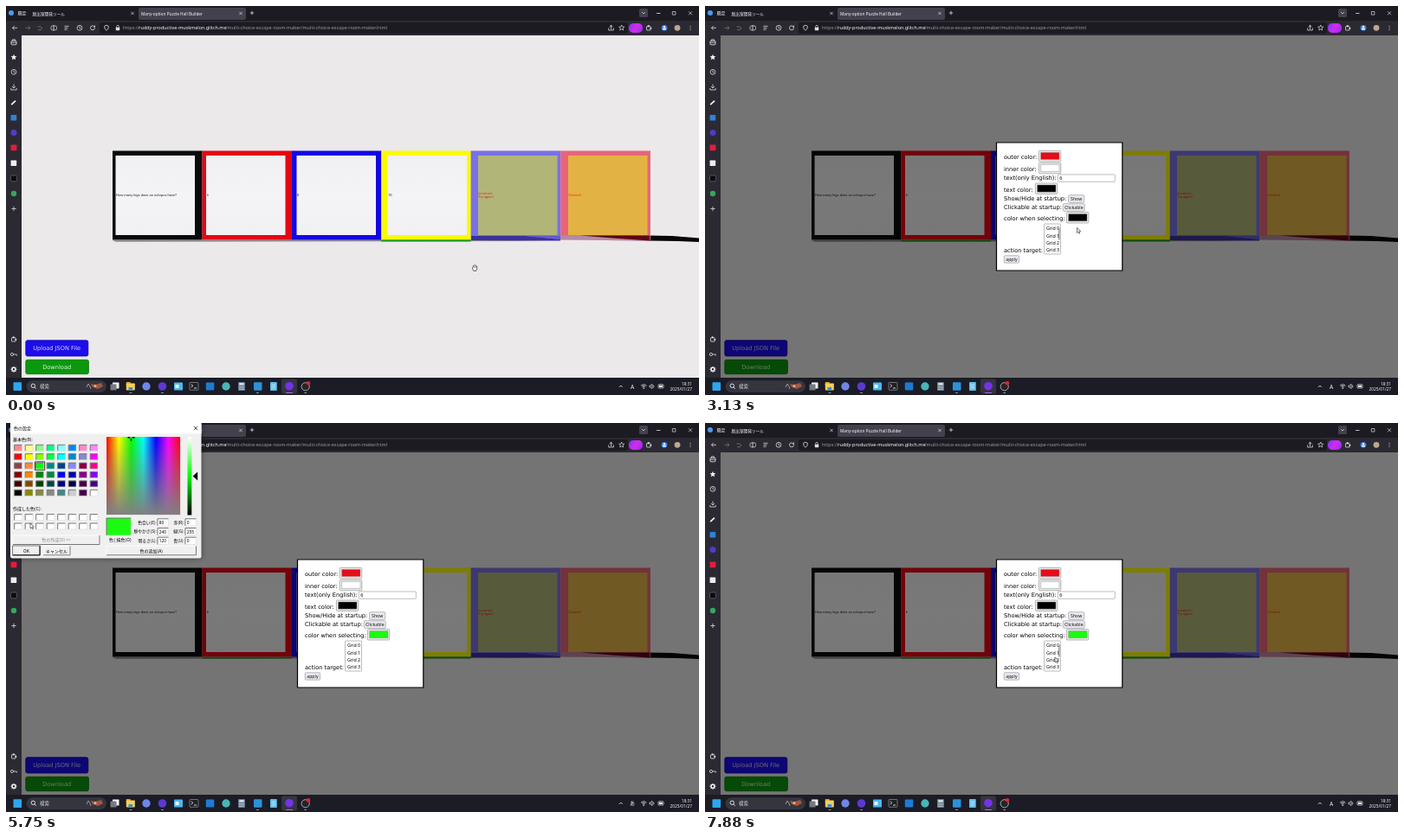
These frames come from a looping animation (800x450 px, 8000 ms). An HTML page with a canvas:

```html
<!DOCTYPE html>
<html lang="ja">
<head>
<meta charset="utf-8">
<title>Screen demo</title>
<style>
html, body { margin: 0; width: 100%; height: 100%; overflow: hidden; background: #1c1b22; }
canvas { display: block; width: 800px; height: 450px; }
</style>
</head>
<body>
<canvas id="stage" width="800" height="450"></canvas>
<script>
const g = document.getElementById('stage').getContext('2d');
const LOOP = 8000;
const UI = '"Noto Sans", "Noto Sans CJK JP", "Noto Sans CJK", sans-serif';
const JP = '"Noto Sans CJK JP", "Noto Sans CJK", sans-serif';
const WIDE = '"DejaVu Sans", sans-serif';
const TINY = 'Roboto, sans-serif';

const DIALOG_OPEN = 1500, PICKER_OPEN = 4250, PICK_GREEN = 5200, PICKER_CLOSE = 6500;

// time, x, y of the pointer tip
const PATH = [
  [0, 541, 303], [250, 541, 303], [1250, 304, 269], [1600, 304, 269],
  [2400, 402, 262], [2750, 403, 266], [3130, 429.5, 256.5], [3750, 429, 245],
  [4150, 429, 245], [4630, 69, 118], [5050, 40, 50], [5300, 40, 50],
  [5750, 28, 116], [6200, 26, 146], [6600, 28, 147], [6750, 32, 149],
  [6950, 40, 152], [7600, 400, 268], [7880, 404, 271], [8000, 404, 272]
];

const BASIC = ('f88 ff8 8f8 0f8 8ff 08f f8c f8f ' +
  'f00 ff0 8f0 0f4 0ff 08c 88c f0f ' +
  '844 f84 0f0 088 048 88f 804 f08 ' +
  '800 f80 080 084 00f 00a 808 80f ' +
  '400 840 040 044 008 004 404 408 ' +
  '000 880 884 888 488 ccc 404 fff').split(' ');

function box(x, y, w, h, fill, r = 0, stroke, lw = 0.6) {
  g.beginPath();
  g.roundRect(x, y, w, h, r);
  if (fill) { g.fillStyle = fill; g.fill(); }
  if (stroke) { g.strokeStyle = stroke; g.lineWidth = lw; g.stroke(); }
}

function dot(x, y, r, fill, stroke, lw = 0.8) {
  g.beginPath();
  g.arc(x, y, r, 0, 7);
  if (fill) { g.fillStyle = fill; g.fill(); }
  if (stroke) { g.strokeStyle = stroke; g.lineWidth = lw; g.stroke(); }
}

function poly(pts, fill, stroke, lw = 0.8, close = true) {
  g.beginPath();
  for (let i = 0; i < pts.length; i += 2) g.lineTo(pts[i], pts[i + 1]);
  if (close) g.closePath();
  if (fill) { g.fillStyle = fill; g.fill(); }
  if (stroke) { g.strokeStyle = stroke; g.lineWidth = lw; g.stroke(); }
}

const line = (pts, color = '#dddde2', lw = 0.8) => poly(pts, null, color, lw, false);

function text(s, x, y, size, color, font = UI, align = 'left') {
  g.font = size + 'px ' + font;
  g.textAlign = align;
  g.fillStyle = color;
  g.fillText(s, x, y);
}

function ramp(x0, y0, x1, y1, stops) {
  const grad = g.createLinearGradient(x0, y0, x1, y1);
  stops.forEach((c, i) => grad.addColorStop(i / (stops.length - 1), c));
  return grad;
}

function cross(x, y, r, color = '#dddde2') {
  line([x - r, y - r, x + r, y + r], color, 0.7);
  line([x + r, y - r, x - r, y + r], color, 0.7);
}

function plus(x, y, r) {
  line([x - r, y, x + r, y]);
  line([x, y - r, x, y + r]);
}

function star(x, y, r, fill, stroke) {
  const pts = [];
  for (let i = 0; i < 10; i++) {
    const a = i * Math.PI / 5 - Math.PI / 2, k = i % 2 ? r * 0.45 : r;
    pts.push(x + k * Math.cos(a), y + k * Math.sin(a));
  }
  poly(pts, fill, stroke, 0.7);
}

function puzzle(x, y) {
  box(x - 2.5, y - 1.8, 4.6, 4.4, null, 0.5, '#dddde2', 0.8);
  dot(x - 0.3, y - 2.2, 1.1, '#dddde2');
  dot(x + 2.4, y + 0.4, 1, '#dddde2');
}

function reload(x, y) {
  g.beginPath();
  g.arc(x, y, 2.5, 0, 5.2);
  g.strokeStyle = '#dddde2';
  g.lineWidth = 0.8;
  g.stroke();
  poly([x + 0.4, y - 1, x + 2.9, y - 3, x + 2.9, y - 0.6], '#dddde2');
}

function clock(x, y) {
  dot(x, y, 2.9, null, '#dddde2');
  line([x, y - 1.8, x, y + 0.2, x + 1.5, y + 0.8]);
}

function drawBrowser() {
  box(0, 0, 800, 17, '#1c1b22');
  box(0, 17, 800, 17, '#2b2a33');
  box(153, 2, 124, 14, '#42414d', 2);
  box(108, 19, 610, 13, '#1c1b22', 2);

  dot(6, 8, 3, '#4a9cf0');
  text('既定', 13.5, 10.4, 5, '#fbfbfe', JP);
  text('脱出室開発ツール', 30.5, 10.6, 4.7, '#fbfbfe', JP);
  text('Many-option Puzzle Hall Builder', 156, 10.6, 4.75, '#fbfbfe');
  cross(146, 8.5, 1.7);
  cross(271, 8.5, 1.7);
  plus(284, 8, 2.2);
  box(731, 3, 10, 10, '#42414d', 1.5);
  line([734.2, 7.2, 736, 9, 737.8, 7.2]);
  line([751, 8.5, 755.5, 8.5]);
  box(769.3, 6.5, 3.6, 3.6, null, 0, '#dddde2', 0.7);
  cross(790, 8.3, 2);

  line([13, 25.3, 7.5, 25.3]);
  line([9.8, 23, 7.5, 25.3, 9.8, 27.6]);
  line([22.5, 25.3, 28, 25.3], '#77767f');
  line([25.7, 23, 28, 25.3, 25.7, 27.6], '#77767f');
  line([36.5, 24, 40, 24, 42, 25.8, 40, 27.6, 37, 27.6], '#77767f');
  box(52, 23, 6.5, 4.8, null, 1.5, '#dddde2', 0.7);
  line([55, 22, 55, 28.6]);
  for (let i = 0; i < 3; i++) line([67.5, 23.3 + i * 2, 72.5 - i, 23.3 + i * 2]);
  clock(85, 25.3);
  reload(100, 25.3);
  poly([113.7, 23.2, 116, 22.2, 118.3, 23.2, 118, 26.2, 116, 28.3, 114, 26.2], null, '#dddde2');
  box(126.8, 24.8, 4.4, 3.4, '#dddde2', 0.5);
  box(127.7, 22.4, 2.6, 4, null, 1.2, '#dddde2', 0.7);
  text('https://', 135, 27.2, 5.45, '#9c9ba3');
  text('ruddy-productive-muskmelon.glitch.me', 153.3, 27.2, 5.45, '#fbfbfe');
  text('/multi-choice-escape-room-maker/multi-choice-escape-room-maker.html', 253.5, 27.2, 5.48, '#9c9ba3');

  line([698.5, 27, 698.5, 22.3]);
  line([696.5, 24.2, 698.5, 22.3, 700.5, 24.2]);
  line([695.7, 25.5, 695.7, 28, 701.3, 28, 701.3, 25.5]);
  star(710.7, 25.3, 3.3, null, '#dddde2');
  box(719, 20, 16, 11, ramp(719, 20, 735, 31, ['#7a35ff', '#d32bea', '#8a2ff5']), 5);
  puzzle(742, 25.4);
  dot(760, 25.3, 3.4, '#3b82e8');
  dot(760, 24.3, 1.2, '#eef4ff');
  box(757.9, 25.8, 4.2, 1.7, '#eef4ff', 0.8);
  dot(775, 25.3, 3.4, '#bca891');
  for (let i = -1; i < 2; i++) dot(790, 25.3 + i * 2, 0.55, '#dddde2');
}

function drawSidebar() {
  box(0, 34, 18, 396, '#2b2a33');
  box(6, 40.3, 6, 4.5, null, 0.8, '#dddde2', 0.9);
  line([7.5, 40, 7.5, 38.8, 10.5, 38.8, 10.5, 40]);
  line([6, 42.3, 12, 42.3]);
  star(9, 59.3, 3.6, '#f5f5f8');
  clock(9, 76.3);
  line([9, 90.5, 9, 95]);
  line([7, 93, 9, 95, 11, 93]);
  line([5.8, 95, 5.8, 97, 12.2, 97, 12.2, 95]);
  line([6.2, 114.2, 11, 109.6], '#f5f5f8', 1.7);
  box(5.6, 126, 6.6, 6.6, '#2f83d8', 0.7);
  dot(9, 146.5, 3.5, '#5639c9');
  box(5.6, 160.5, 6.8, 6.8, '#e51c3e', 0.7);
  box(5.6, 178.5, 6.6, 6.6, '#eeeeee', 0.7);
  box(5.6, 196, 6.8, 6.8, '#0c0c0e', 1.2, '#77777c');
  dot(9, 217, 3.2, '#36a760');
  plus(9, 234.5, 2.6);
  puzzle(9, 385.5);
  dot(7, 403, 1.6, null, '#dddde2');
  line([8.6, 403, 12.3, 403, 12.3, 404.6]);
  for (let i = 0; i < 4; i++) {
    const a = i * Math.PI / 4, c = 3.4 * Math.cos(a), s = 3.4 * Math.sin(a);
    line([9 - c, 420.3 - s, 9 + c, 420.3 + s], '#f5f5f8', 1.2);
  }
  dot(9, 420.3, 1.9, '#2b2a33', '#f5f5f8', 1.3);
}

function cell(x, outer, inner, ix) {
  box(x, 167.5, 103.6, 103, outer);
  box(ix, 173, 91.5, 92, inner);
}

function drawScene(t) {
  box(18, 34, 782, 396, '#ebe9ea');
  poly([123, 271, 536, 270, 640, 272, 440, 272.3, 127, 272.8], '#8b898b');
  poly([741, 265.5, 769, 266, 800, 268.5, 800, 273, 775, 272, 741, 271.5], '#080808');

  const white = ramp(0, 173, 0, 265, ['#f0eff1', '#f4f3f5', '#f1f0f2']);
  cell(123, '#0b0a0b', white, 126.5);
  cell(226.6, '#e60613', white, 231);
  cell(330, '#1407e4', white, 335.5);
  cell(433.2, '#fbfb05', white, 440.5);
  cell(536.6, '#7a70e8', '#b1b678', 545);
  cell(640.2, '#e86478', '#e2b344', 649);
  box(743.2, 167, 0.5, 104, '#d9727f');
  box(433.2, 270.5, 103.4, 2, '#159a18');
  if (t > 1000) box(226.6, 270.8, 103.4, 1.7, '#159a18');

  // shadows seen through the two translucent cells
  poly([537, 266, 600, 266, 640, 270, 640, 271.5, 537, 271], '#3a319f');
  poly([600, 266, 640, 266, 640, 270], '#655bd2');
  poly([640, 265.5, 680, 265.5, 743, 270.5, 743, 272, 640, 270], '#b58aa5');
  poly([663, 265.5, 743, 265.5, 743, 271.5, 700, 268.5], '#5f0710');

  text('How many legs does an octopus have?', 127, 220.3, 4.05, '#242225', TINY);
  text('6', 231.7, 220.3, 4.05, '#242225', TINY);
  text('8', 336, 220.3, 4.05, '#242225', TINY);
  text('10', 441, 220.3, 4.05, '#242225', TINY);
  text('incorrect', 545.3, 218, 4.05, '#e0202a', TINY);
  text('Try again!', 545.3, 222.4, 4.05, '#e0202a', TINY);
  text('Correct!', 649.5, 220.3, 4.05, '#e2242a', TINY);

  box(22.8, 386.8, 72, 18.2, '#1d0dec', 2, '#0d06a8', 0.8);
  text('Upload JSON File', 58.7, 398.2, 6.65, '#d9d7fb', WIDE, 'center');
  box(22.8, 409.3, 72.6, 16.4, '#0b980e', 2, '#08700a', 0.8);
  text('Download', 58.7, 420.2, 6.65, '#dff5df', WIDE, 'center');
}

function swatch(x, y, color) {
  box(x + 0.4, y + 0.4, 25.4, 12.4, '#efefef', 1, '#858585');
  box(x + 2.6, y + 2.4, 21.4, 8.2, color, 0, '#8a8a8a', 0.5);
}

function button(s, x, y, w, h) {
  box(x, y, w, h, '#e9e9ed', 1.2, '#8f8f9d');
  text(s, x + w / 2, y + h / 2 + 2, 5.2, '#111', UI, 'center');
}

function drawDialog(t) {
  box(18, 34, 782, 396, 'rgba(0,0,0,0.5)');
  box(336.5, 158, 145.3, 148, '#fff', 0, '#000', 1.2);
  const rows = [['outer color:', 177.2], ['inner color:', 190.8], ['text(only English):', 201.2],
    ['text color:', 214.6], ['Show/Hide at startup:', 225.2], ['Clickable at startup:', 235.2],
    ['color when selecting:', 248.4], ['action target:', 284.6]];
  rows.forEach(([s, y]) => text(s, 345, y, 6.65, '#000', WIDE));
  swatch(385, 167, '#e60c18');
  swatch(385, 181, '#fff');
  box(407.3, 195, 66, 8.3, '#fff', 0.7, '#8f8f9d');
  text('6', 409.2, 201.2, 5.3, '#000');
  swatch(381, 204.6, '#000');
  button('Show', 419.5, 218.7, 18.3, 8.6);
  button('Clickable', 413.3, 228.7, 25, 8.6);
  swatch(417, 238.2, t < PICK_GREEN ? '#000' : '#1cfa12');
  box(391.5, 252, 19, 35, '#fff', 0.8, '#8f8f9d');
  for (let i = 0; i < 4; i++) text('Grid ' + i, 394, 259.2 + i * 8.35, 5.3, '#000');
  if ((t > 2100 && t < 4900) || t > 7400) box(408.2, 256.5, 1.2, 14, '#77777c', 0.6);
  button('apply', 345.2, 288.7, 17.4, 8.5);
}

function sunken(x, y, w, h, fill) {
  box(x, y, w, h, fill);
  line([x, y + h, x, y, x + w, y], '#777', 1);
  line([x, y + h, x + w, y + h, x + w, y], '#d8d8d8', 0.6);
}

function winButton(s, x, y, w, color = '#000', edge = '#777') {
  box(x, y, w, 10.5, '#f0f0f0', 0, '#fff', 0.8);
  line([x, y + 10.5, x + w, y + 10.5, x + w, y], edge, 1);
  text(s, x + w / 2, y + 7.2, 5, color, JP, 'center');
}

function drawPicker(t) {
  const green = t >= PICK_GREEN;
  g.save();
  g.shadowColor = 'rgba(0,0,0,0.5)';
  g.shadowBlur = 6;
  box(5, -1, 220.5, 157.5, '#f0f0f0', 2.5);
  g.restore();
  box(5, 0, 220.5, 12.5, '#fff');
  text('色の設定', 9, 8.2, 5, '#000', JP);
  cross(219, 6, 2.1, '#111');

  text('基本色(B):', 8, 21.4, 5, '#000', JP);
  BASIC.forEach((c, i) => {
    const x = 9.7 + (i % 8) * 12.5, y = 25.3 + Math.floor(i / 8) * 10.4;
    sunken(x, y, 8.8, 7, '#' + c);
    if (i === (green ? 18 : 40)) box(x - 1.2, y - 1.2, 11.2, 9.4, null, 0, '#000', 0.8);
  });
  text('作成した色(C):', 8, 101.4, 5, '#000', JP);
  for (let i = 0; i < 16; i++) sunken(9.7 + (i % 8) * 12.5, 105.6 + (i >> 3) * 10.4, 8.8, 7, '#fff');
  winButton('色の作成(D) >>', 8, 130, 100, '#8a8a8a');
  winButton('OK', 8, 142.3, 31, '#000', '#000');
  box(7.6, 142, 31.8, 11, null, 0, '#222', 0.6);
  winButton('キャンセル', 43, 142.3, 31);
  winButton('色の追加(A)', 116, 142.3, 103.5);

  box(116, 16, 85.5, 90.5, ramp(116, 0, 201.5, 0, ['#f00', '#ff0', '#0f0', '#0ff', '#00f', '#f0f', '#f00']));
  box(116, 16, 85.5, 90.5, ramp(0, 16, 0, 106.5, ['rgba(128,128,128,0)', 'rgb(128,128,128)']));
  line([201.5, 16, 201.5, 106.5, 116, 106.5], '#fff', 0.7);
  g.save();
  g.beginPath();
  g.rect(116, 16, 85.5, 90.5);
  g.clip();
  const cx = green ? 144.5 : 173.2, cy = green ? 16.8 : 105.2;
  for (const [dx, dy] of [[1, 0], [-1, 0], [0, 1], [0, -1]])
    line([cx + dx * 1.3, cy + dy * 1.3, cx + dx * 4, cy + dy * 4], '#000', 1.4);
  g.restore();
  box(209.5, 16, 4.8, 90.5, ramp(0, 16, 0, 106.5, ['#fff', green ? '#0f0' : '#808080', '#000']));
  const ay = green ? 61.5 : 106;
  poly([215.8, ay, 221.2, ay - 5, 221.2, ay + 5], '#000');
  sunken(116, 110, 28.3, 20, green ? '#1cfa12' : '#000');
  text('色 | 純色(O)', 119, 137, 5, '#000', JP);

  const left = [['色合い(E):', green ? 80 : 160], ['鮮やかさ(S):', green ? 240 : 0], ['明るさ(L):', green ? 120 : 0]];
  const right = [['赤(R):', 0], ['緑(G):', green ? 255 : 0], ['青(U):', 0]];
  for (let i = 0; i < 3; i++) {
    const y = 110.8 + i * 10.7;
    [[left[i], 175], [right[i], 207]].forEach(([[label, v], x]) => {
      text(label, x - 1, y + 5.8, 4.8, '#000', JP, 'right');
      sunken(x, y, 12.6, 8.2, '#fff');
      text(v, x + 1.7, y + 6, 4.8, '#000');
    });
  }
}

function drawTaskbar(t) {
  box(0, 430, 800, 20, '#1b1c25');
  box(8.5, 435.3, 9.6, 9.6, '#2ea5ef', 0.7);
  box(24, 433.8, 91.5, 12.6, '#34353f', 6.3, '#474852', 0.5);
  dot(31.3, 439.3, 2.2, null, '#f0f0f4', 0.9);
  line([32.9, 441, 34.7, 442.8], '#f0f0f4', 0.9);
  text('検索', 39, 442.2, 5.4, '#dddde4', JP);
  line([93, 441, 95, 437, 97, 440, 98, 443], '#b7b3b5', 0.8);
  poly([98, 437, 103, 438, 110, 436, 112, 440, 106, 443, 100, 441], '#a6563c');
  dot(103, 439.5, 1.5, '#d6b795');

  box(123, 435.5, 7.5, 7, '#f2f2f2', 0.5);
  box(120.5, 437.5, 7, 7, '#777981', 0.5);
  box(138.8, 435, 5, 4, '#e0a020', 0.6);
  box(138.8, 436.5, 10, 8, '#f9cf58', 0.7);
  box(141.5, 441, 4.6, 3.5, '#3c8fd4', 0.5);
  dot(162, 440, 4.7, '#6f86e8');
  dot(180.5, 440, 4.8, '#5a3ad2');
  box(194, 435.5, 10, 9, '#49b9f1', 0.8);
  box(195.5, 438, 4, 4, '#eaf6fc');
  box(212, 435.5, 10, 8.8, '#202124', 0.8, '#aaa');
  line([213.8, 437.6, 215.8, 439.4, 213.8, 441.2], '#fff');
  line([217, 442, 220, 442], '#fff');
  box(230.8, 435.5, 9.5, 9, '#1c7cd5', 1);
  dot(254, 440, 4.7, '#48b7b6');
  box(268, 435, 8, 10, '#68788a', 0.8);
  box(269.3, 436.3, 5.4, 2, '#e8f5fc');
  for (let i = 0; i < 9; i++) box(269.3 + (i % 3) * 2, 439.4 + Math.floor(i / 3) * 1.8, 1.3, 1.1, '#c6d4df');
  box(286, 435.3, 9.5, 9.5, '#2b92d9', 1);
  box(305, 435, 7.8, 10, '#61bde8', 0.8);
  for (let i = 0; i < 3; i++) line([306.6, 438 + i * 2, 311.2, 438 + i * 2], '#e9f8ff', 0.7);
  box(318, 431.5, 18, 17, '#343540', 2);
  dot(327, 439.7, 4.8, '#7433e8');
  dot(345.7, 440.3, 4.6, '#25252a', '#c9c9ce', 0.8);
  dot(349, 436.3, 2.3, '#e8212b');
  for (const x of [144, 180.5, 290.5, 345.7]) box(x - 1.5, 447, 3, 0.9, '#9a9ba3', 0.4);
  box(323, 447, 8, 1, '#b06fe0', 0.5);

  line([707.8, 441, 709.8, 439, 711.8, 441], '#eee');
  if (t >= 4300 && t < 6500) text('あ', 723, 442.4, 6, '#f2f2f2', JP, 'center');
  else text('A', 723, 442.5, 6.6, '#f2f2f2', UI, 'center');
  for (let r = 1.5; r < 5; r += 1.5) {
    g.beginPath();
    g.arc(736.2, 442.3, r, -2.4, -0.75);
    g.strokeStyle = '#f2f2f2';
    g.lineWidth = 0.7;
    g.stroke();
  }
  dot(736.2, 442.2, 0.7, '#f2f2f2');
  poly([743, 439, 744.3, 439, 746, 437.4, 746, 442.6, 744.3, 441, 743, 441], null, '#f2f2f2', 0.7);
  line([747.3, 438.5, 748, 440, 747.3, 441.5], '#f2f2f2', 0.7);
  box(753, 437.8, 6, 4.2, null, 0.8, '#f2f2f2', 0.7);
  box(754, 438.8, 4, 2.2, '#f2f2f2');
  text('18:31', 792, 438.8, 4.8, '#f2f2f2', UI, 'right');
  text('2025/01/27', 792, 445.3, 4.8, '#f2f2f2', UI, 'right');
}

function pointerAt(t) {
  let i = 1;
  while (i < PATH.length - 1 && PATH[i][0] < t) i++;
  const [t0, x0, y0] = PATH[i - 1], [t1, x1, y1] = PATH[i];
  const u = (t - t0) / (t1 - t0), k = u * u * (3 - 2 * u);
  return [x0 + (x1 - x0) * k, y0 + (y1 - y0) * k];
}

function drawPointer(t) {
  const [x, y] = pointerAt(t);
  g.save();
  g.translate(x, y);
  g.lineJoin = 'round';
  if (t < DIALOG_OPEN && y > 273) {
    poly([-2.8, 0, -1.8, -0.5, -1.5, -2.6, -0.4, -3, 0.4, -3.1, 1.4, -2.7, 2.6, -2, 2.7, 0.6, 1.7, 3.4, -1.2, 3.4],
      '#fff', '#222', 0.7);
    for (let i = 0; i < 3; i++) line([-0.7 + i * 1.1, -2.2, -0.6 + i * 1.1, -0.3], '#333', 0.4);
  } else {
    poly([0, 0, 0, 5.9, 1.4, 4.7, 2.4, 6.8, 3.3, 6.4, 2.4, 4.3, 4.2, 4.2], '#fff', '#222', 0.6);
  }
  g.restore();
}

function draw(t) {
  drawScene(t);
  if (t >= DIALOG_OPEN) drawDialog(t);
  drawBrowser();
  drawSidebar();
  drawTaskbar(t);
  if (t >= PICKER_OPEN && t < PICKER_CLOSE) drawPicker(t);
  drawPointer(t);
}

const start = performance.now();
function tick() {
  draw((performance.now() - start) % LOOP);
  requestAnimationFrame(tick);
}
tick();
</script>
</body>
</html>
```
